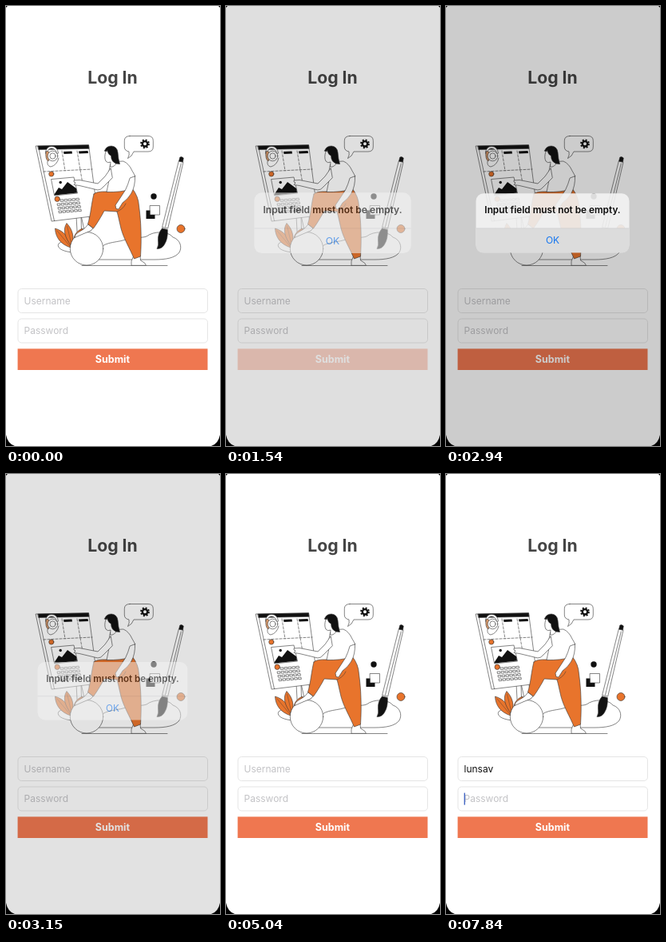
An HTML page that plays this animation: 268x550 px, repeating every 8000 ms.

```html
<!DOCTYPE html>
<html lang="en">
<head>
<meta charset="utf-8">
<title>Log In</title>
<style>
  html, body { margin: 0; width: 100%; height: 100%; overflow: hidden; background: #fff; }
  svg { display: block; width: 268px; height: 550px; }
  text { font-family: Inter, "Liberation Sans", sans-serif; font-size: 12px; white-space: pre; }
  .mid { text-anchor: middle; }
  .hint { fill: #c3c3c6; }
  .field { fill: #fff; stroke: #e2e2e2; stroke-width: .9; }
  .art { stroke: #333; stroke-width: .6; fill: #fff; stroke-linejoin: round; stroke-linecap: round; }
  .ink { fill: #111; }
  .warm { fill: #e8742c; }
  .none { fill: none; }
  .bare { stroke: none; }
</style>
</head>
<body>
<svg viewBox="0 0 268 550">
  <rect width="268" height="550" fill="#fff"/>
  <text class="mid" x="133.5" y="97" style="font-size:21.2px;font-weight:700" fill="#454545">Log In</text>

  <g class="art">
    <!-- ground -->
    <path d="M84 308C70 307 63 302 66 297C71 292 84 294 92 297L118 303C124 294 142 296 152 291C161 287 168 291 176 288C185 281 203 281 209 289C218 292 221 301 217 308C212 315 200 317 186 317H112Z"/>
    <path class="none" d="M95 324.5H202"/>

    <!-- easel -->
    <path d="M88 262L90 300H95L94 262Z"/>
    <path d="M94 262L99 284M104 263L106 281" class="none"/>
    <path d="M37.5 175L103.5 173.8L115 262L57.5 269Z"/>
    <path class="none" d="M41 178L60.5 268.6"/>
    <path class="ink" d="M40 175L103.5 173.8L104 178.3L41 179.5Z"/>
    <path class="ink bare" d="M72 182L82.5 181.6L83 184.6L72.5 185ZM91 181.4L102.5 181L103 184L91.5 184.4Z"/>
    <path class="none" stroke-dasharray="3 2" d="M70 181L74 206M89 181L93 205M47 207L108 204M93 205L96 222"/>

    <!-- headphones -->
    <path d="M49.5 184Q50 175.500 57 175.500Q64.500 175.500 65.500 184L64 185Q62 178 57 178Q52 178 51.500 185Z"/>
    <path fill="#d99a6c" d="M50 182Q53.500 180 54.500 185Q55 191 53 194Q49 192 50 182Z"/>
    <circle cx="58.500" cy="187.500" r="6.300"/>
    <circle class="none" cx="58.500" cy="187.500" r="3.600"/>
    <path class="none" d="M52 194Q51 200 56 201Q64 199 66 190"/>

    <!-- pinned picture -->
    <path d="M57 216.5L85 214L89.5 234L61 237Z"/>
    <path class="ink bare" d="M60.5 235.5L66 227L70 229L77 220L88 228L89 233.6L61 236.4Z"/>
    <circle class="ink bare" cx="68.2" cy="220.5" r="1.7"/>
    <circle class="warm" cx="56.8" cy="210" r="3.1"/>
    <path id="days" class="none"/>
    <circle class="warm" cx="64.2" cy="241.3" r="3.2"/>

    <!-- leaves -->
    <path class="warm" d="M81 302C68 298 62 289 61.5 278C72 281 81 290 81 302Z"/>
    <path class="warm" d="M82 300C73 289 71 279 76 271.5C84 280 86 290 82 300Z"/>
    <path class="warm" d="M85 298C83 288 88 281 96 278C98 286 94 294 85 298Z"/>
    <path class="none" stroke-width=".4" d="M64 281L80 300M76.5 275L82 298M94 281L86 296"/>

    <circle cx="101" cy="303.300" r="20.700"/>

    <!-- person -->
    <path d="M103 273L109 278L106 281Q96 285 86 289.500Q86 285 92 282Q99 279 103 273Z"/>
    <path d="M160 312L157 319V324.300H175.500Q175 321 168.500 318L168 312Z"/>
    <path class="warm" d="M110 235Q113 231.500 126 232L158 228Q166 238 166.500 250C169 268 170 290 168.500 313L160.500 316C155 303 147 290 144 278C142 270 141 264 139 257L123 256C120 262 114 272 109.500 278L102.500 272.500C106 262 107 246 110 235Z"/>
    <path class="none" d="M139 257Q147 254 150 247" stroke-width=".5"/>
    <path d="M131 197.500Q138 193 147 194Q154 197 158 206L162 213L155 217Q155 224 157 229Q143 233 126 232.500Q130 219 129 207Z"/>
    <path d="M131 203L124 213L115 222L92 217.500L85 218Q84 220 87 221L85 223.500L92 224.500L115 230Q119 230 122 226L133 215Z"/>
    <path d="M155 215.500Q153 223 149.500 230L143 240L137 249L138 253.500L141 254L146 246Q153 241 157 234Q162 225 161.500 213Z"/>
    <path d="M125 182Q122.500 189 125 194Q127.500 197 131 195L130.500 201Q136 202 139 195L137 182Z"/>
    <path class="ink" d="M123.500 181Q125.500 175 132 175Q139 175.500 140 183Q140.500 191 142.500 197.500Q137 198 133.500 194Q131.500 191 131.500 187Q128 186 127 180.500Q125 182.500 123.500 181Z"/>

    <!-- speech bubble -->
    <path d="M155 162.500H178Q184.300 162.500 184.300 168.500V176Q184.300 182 178 182H160Q158 188 152.500 190.500Q155 186 154 182Q148.300 181 148.300 176V168.500Q148.300 162.500 155 162.500Z"/>
    <circle cx="174" cy="172.300" r="4.900" fill="none" stroke="#111" stroke-width="2" stroke-dasharray="1.950 1.900" stroke-linecap="butt"/>
    <circle cx="174" cy="172.300" r="3.200" fill="#fff" stroke="#111" stroke-width="2.400"/>

    <!-- brush -->
    <path d="M216.700 194L222 195.300L202.700 278L196 276.500Z"/>
    <path class="none" d="M219.300 197L199.500 276"/>
    <path class="ink" d="M217 192L217.800 189Q220 187.500 222.300 190L221.500 195L216.700 194Z"/>
    <path class="ink" d="M195.500 278L202.300 279.500Q203 291 198.500 298Q195.500 303.500 189 303.500Q191.500 299 190.500 293Q190 284 195.500 278Z"/>

    <!-- loose shapes -->
    <circle class="ink bare" cx="185" cy="238" r="3.700"/>
    <rect class="ink bare" x="175.500" y="255.500" width="11" height="10.500"/>
    <rect x="180.500" y="249.500" width="12" height="11.500"/>
    <circle class="warm" cx="219" cy="278.500" r="5"/>
  </g>

  <rect class="field" x="15" y="353.500" width="237.500" height="30" rx="4.500"/>
  <rect class="field" x="15" y="391" width="237.500" height="30" rx="4.500"/>
  <text id="userHint" class="hint" x="22.500" y="373">Username</text>
  <text id="user" x="22.500" y="373" fill="#111"></text>
  <text class="hint" x="22.500" y="410">Password</text>
  <rect id="caret" width="1.400" height="15" fill="#4467c4"/>

  <g id="button">
    <rect x="14.600" y="428.400" width="237.900" height="26.600" fill="#ef7750"/>
    <text class="mid" x="133.400" y="445.800" style="font-size:12.500px;font-weight:700" fill="#fff">Submit</text>
  </g>

  <rect id="dim" width="268" height="550" opacity="0"/>
  <g id="alert" opacity="0">
    <rect x="37.500" y="234.200" width="192" height="74" rx="9.500" fill="#f3f3f3" fill-opacity=".9"/>
    <path id="press" d="M37.500 278H229.500V298.700Q229.500 308.200 220 308.200H47Q37.500 308.200 37.500 298.700Z" opacity="0" fill="#dcdcdc"/>
    <path d="M37.500 277.800H229.500" stroke="#c4c4c6" stroke-width=".5"/>
    <text class="mid" x="133.500" y="259.300" style="font-size:11.800px;font-weight:600" fill="#0a0a0a">Input field must not be empty.</text>
    <text class="mid" x="133.500" y="297.200" fill="#1677f0">OK</text>
  </g>

  <path d="M0 536Q2 547 11 550H0ZM268 536Q266 547 257 550H268ZM0 0H2L0 2ZM268 0H266L268 2Z"/>
</svg>
<script>
  const $ = id => document.getElementById(id);
  const set = (id, attrs) => {
    for (const k in attrs) $(id).setAttribute(k, attrs[k]);
  };
  const LOOP = 8000, TICK = 70;
  const NAME = "lunsav";
  const KEYS = [5250, 5460, 5670, 5950, 6090, 6300];

  const ramp = (t, from, to) => Math.min(1, Math.max(0, (t - from) / (to - from)));
  const easeOut = (p, power) => 1 - (1 - p) ** power;
  const easeInOut = p => p < .5 ? 2 * p * p : 1 - 2 * (1 - p) ** 2;

  let days = "";
  for (let r = 0; r < 4; r++) {
    for (let c = r ? 0 : 1; c < 6; c++) {
      const x = 63.5 + c * 4.9 + r * .9, y = 242.500 + r * 4.600 - c * .4;
      days += `M${x} ${y}l3.200-.3 .5 2.400-3.200.3z`;
    }
  }
  set("days", { d: days });

  function caretAlpha(t) {
    if (t < 4340) return 0;
    if (t < 5250) return 1 - ramp(t, 4900, 5040);
    if (t < 7200) return 1 - ramp(t, 6860, 7070);
    return t < 7840 ? ramp(t, 7210, 7490) : 1;
  }

  function draw(t) {
    const pressed = t >= 1260 && t < 1470;
    const release = easeInOut(ramp(t, 1470, 1715));
    set("button", { opacity: pressed ? .2 : t < 1260 ? 1 : .2 + .8 * release });

    const enter = easeOut(ramp(t, 1470, 1870), 5);
    const leave = easeOut(ramp(t, 3080, 3480), 3);
    const shown = enter * (1 - leave);
    const scale = 1 + .06 * (1 - enter) - .05 * leave;
    set("dim", { opacity: .2 * shown });
    set("alert", {
      opacity: shown,
      transform: `translate(133.500 271.200) scale(${scale}) translate(-133.500 -271.200)`
    });
    set("press", { opacity: t >= 2800 && t < 3080 ? 1 : 0 });

    const count = KEYS.filter(k => t >= k).length;
    const user = $("user");
    user.textContent = NAME.slice(0, count);
    set("userHint", { opacity: count ? 0 : 1 });

    const inPassword = t >= 7840;
    const width = count && !inPassword ? user.getComputedTextLength() : 0;
    set("caret", { x: 22.6 + width, y: inPassword ? 398.6 : 361.3, opacity: caretAlpha(t) });
  }

  const start = performance.now();
  function frame() {
    const t = (performance.now() - start) % LOOP;
    draw(Math.floor(t / TICK) * TICK);
    requestAnimationFrame(frame);
  }
  frame();
</script>
</body>
</html>
```
